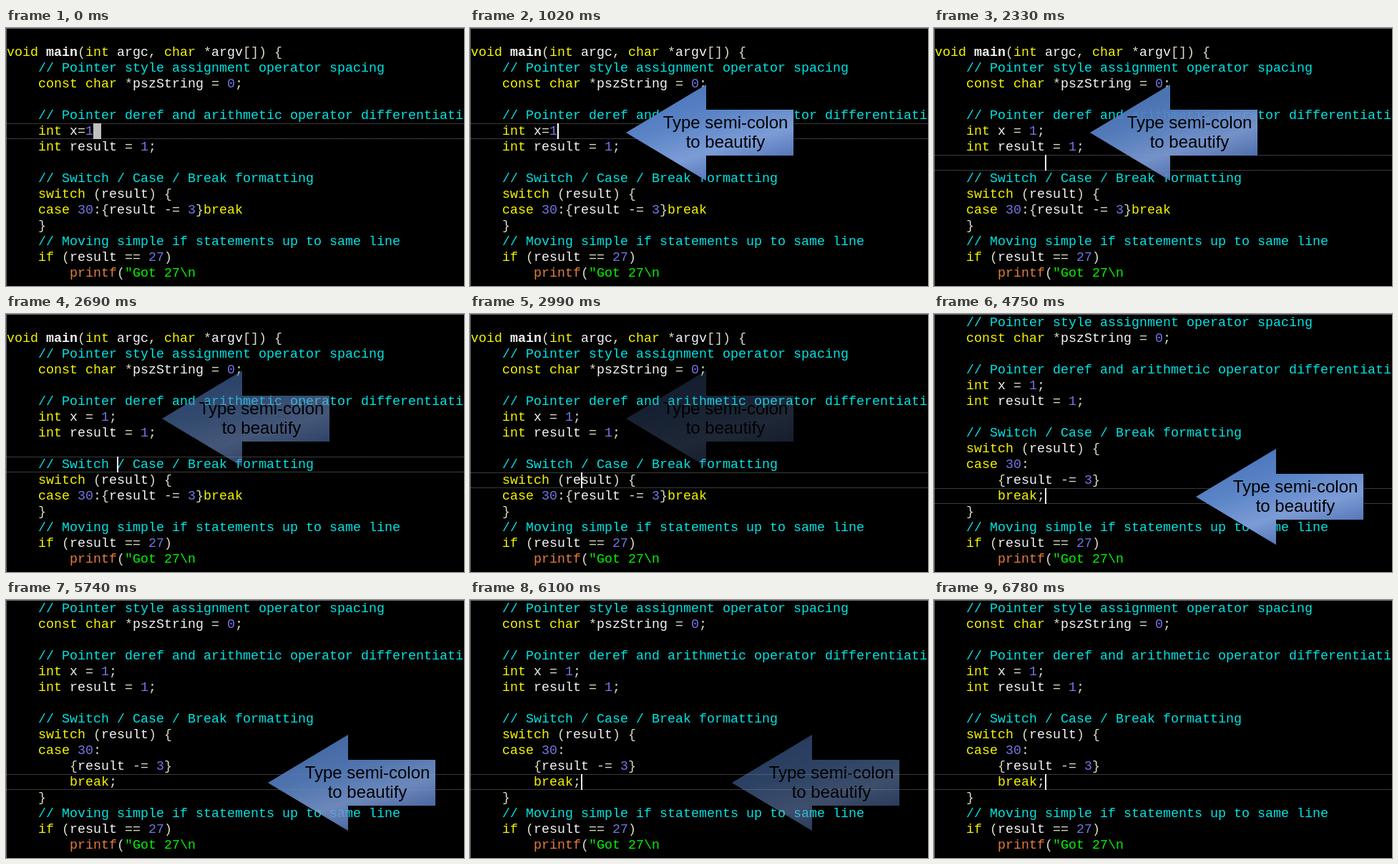
An HTML page with a canvas for the animation above (6.98 s loop, 640x360 px).

```html
<!DOCTYPE html>
<html lang="en">
<head>
<meta charset="utf-8">
<title>Code beautifier</title>
<style>
html, body { margin: 0; width: 100%; height: 100%; overflow: hidden; background: #000; }
canvas { display: block; }
</style>
</head>
<body>
<canvas id="stage" width="640" height="360"></canvas>
<script>
const ctx = document.getElementById('stage').getContext('2d');
const LOOP = 6980, STEP = 60, BLINK = 505;
const CHAR = 11, ROW = 22, LEFT = 1, TOP = 23, BASELINE = 16;
const MONO = '18.33px "Liberation Mono", monospace';

// Key presses: first semicolon, repeated Down, End, second semicolon
const TYPE_1 = 1350, DOWN = 2070, END = 3490, TYPE_2 = 4750;
const REPEAT = 245, DOWNS = 5, FIRST_ROW = 5;

const COLOR = {
  keyword: '#f4f400', comment: '#00e4e4', number: '#7474e4',
  string: '#00f400', call: '#e47c3c', op: '#dcdcc4', plain: '#f4f4f4',
  frame: '#6c6c78', dots: '#747474'
};
const KEYWORDS = /^(void|int|char|const|switch|case|break|if)$/;

const HEAD = [
  'void main(int argc, char *argv[]) {',
  '    // Pointer style assignment operator spacing',
  '    const char *pszString = 0;',
  '',
  '    // Pointer deref and arithmetic operator differentiation'
];
const MIDDLE = [
  '    int result = 1;',
  '',
  '    // Switch / Case / Break formatting',
  '    switch (result) {'
];
const TAIL = [
  '    }',
  '    // Moving simple if statements up to same line',
  '    if (result == 27)',
  '        printf("Got 27\\n'
];

const ARROWS = [
  { x: 218, y: 79, fadeIn: 120, fadeOut: 2330 },
  { x: 366, y: 188, fadeIn: 3050, fadeOut: 5680 }
];

const clamp = (v, lo, hi) => Math.max(lo, Math.min(hi, v));
const count = (t, start, period) => Math.floor((t - start) / period) + 1;

function codeAt(t) {
  const first = t < TYPE_1 ? '    int x=1' : '    int x = 1;';
  const cases = t < TYPE_2
    ? ['    case 30:{result -= 3}break']
    : ['    case 30:', '        {result -= 3}', '        break;'];
  return [...HEAD, first, ...MIDDLE, ...cases, ...TAIL];
}

// Every key press moves the caret and restarts its blinking
function caretAt(t, lines, scroll) {
  const downs = clamp(count(t, DOWN, REPEAT), 0, DOWNS);
  const row = FIRST_ROW + downs;
  const atEnd = t < TYPE_1 || t >= END;
  const col = lines[atEnd ? row + scroll : FIRST_ROW].length;
  const lastDown = DOWN + (downs - 1) * REPEAT;
  const keys = [0, TYPE_1, lastDown, END, TYPE_2].filter(k => k <= t);
  const idle = t - Math.max(...keys);
  return {
    x: LEFT + col * CHAR,
    y: TOP + row * ROW,
    visible: Math.floor(idle / BLINK) % 2 === 0
  };
}

function colorOf(token) {
  if (token.startsWith('//')) return COLOR.comment;
  if (token[0] === '"') return COLOR.string;
  if (KEYWORDS.test(token)) return COLOR.keyword;
  if (token === 'printf') return COLOR.call;
  if (/^\d/.test(token)) return COLOR.number;
  return /^\w/.test(token) ? COLOR.plain : COLOR.op;
}

function drawLine(line, baseline) {
  for (const m of line.matchAll(/\/\/.*|".*|\w+|[^\w\s]/g)) {
    ctx.font = (m[0] === 'main' ? 'bold ' : '') + MONO;
    ctx.fillStyle = colorOf(m[0]);
    ctx.fillText(m[0], LEFT + m.index * CHAR, baseline);
  }
}

function drawDots(y) {
  ctx.fillStyle = COLOR.dots;
  for (let x = 1; x < 640; x += 2) ctx.fillRect(x, y, 1, 1);
}

// The callout is built once so that it fades as a single layer
function makeArrow() {
  const width = 234, height = 134, head = 112, inset = 35;
  const layer = document.createElement('canvas');
  layer.width = width;
  layer.height = height;
  const g = layer.getContext('2d');
  const fill = g.createLinearGradient(90, 0, 130, height);
  fill.addColorStop(0, '#4c76ba');
  fill.addColorStop(0.35, '#5a84c6');
  fill.addColorStop(0.7, '#7c9cd6');
  fill.addColorStop(1, '#5272b4');
  g.fillStyle = fill;
  g.moveTo(0, height / 2);
  g.lineTo(head, 0);
  g.lineTo(head, height);
  g.closePath();
  g.rect(head, inset, width - head, height - 2 * inset);
  g.fill();
  g.font = '24px "Liberation Sans", Arial, sans-serif';
  g.textAlign = 'center';
  g.fillStyle = '#000';
  g.fillText('Type semi-colon', 139, 61);
  g.fillText('to beautify', 139, 88);
  return layer;
}
const arrowLayer = makeArrow();

function arrowAlpha(t, a) {
  return t < a.fadeOut
    ? clamp(count(t, a.fadeIn, STEP) / 5, 0, 1)
    : clamp(1 - count(t, a.fadeOut, STEP) / 16, 0, 1);
}

function draw(t) {
  ctx.globalAlpha = 1;
  ctx.fillStyle = '#000';
  ctx.fillRect(0, 0, 640, 360);

  const lines = codeAt(t);
  const scroll = t < TYPE_2 ? 0 : 2;
  const caret = caretAt(t, lines, scroll);
  drawDots(caret.y);
  drawDots(caret.y + ROW - 1);
  lines.forEach((line, i) => drawLine(line, TOP + (i - scroll) * ROW + BASELINE));

  // The caret starts as a block and turns into a bar
  const block = t < STEP;
  ctx.fillStyle = block ? '#c0c0c0' : '#fff';
  if (caret.visible) ctx.fillRect(caret.x, caret.y, block ? CHAR : 2, ROW);

  ctx.fillStyle = COLOR.frame;
  ctx.fillRect(0, 0, 640, 1);
  ctx.fillRect(0, 0, 1, 360);

  for (const a of ARROWS) {
    ctx.globalAlpha = arrowAlpha(t, a);
    ctx.drawImage(arrowLayer, a.x, a.y);
  }
}

const start = performance.now();
function tick() {
  draw((performance.now() - start) % LOOP);
  requestAnimationFrame(tick);
}
tick();
</script>
</body>
</html>
```
